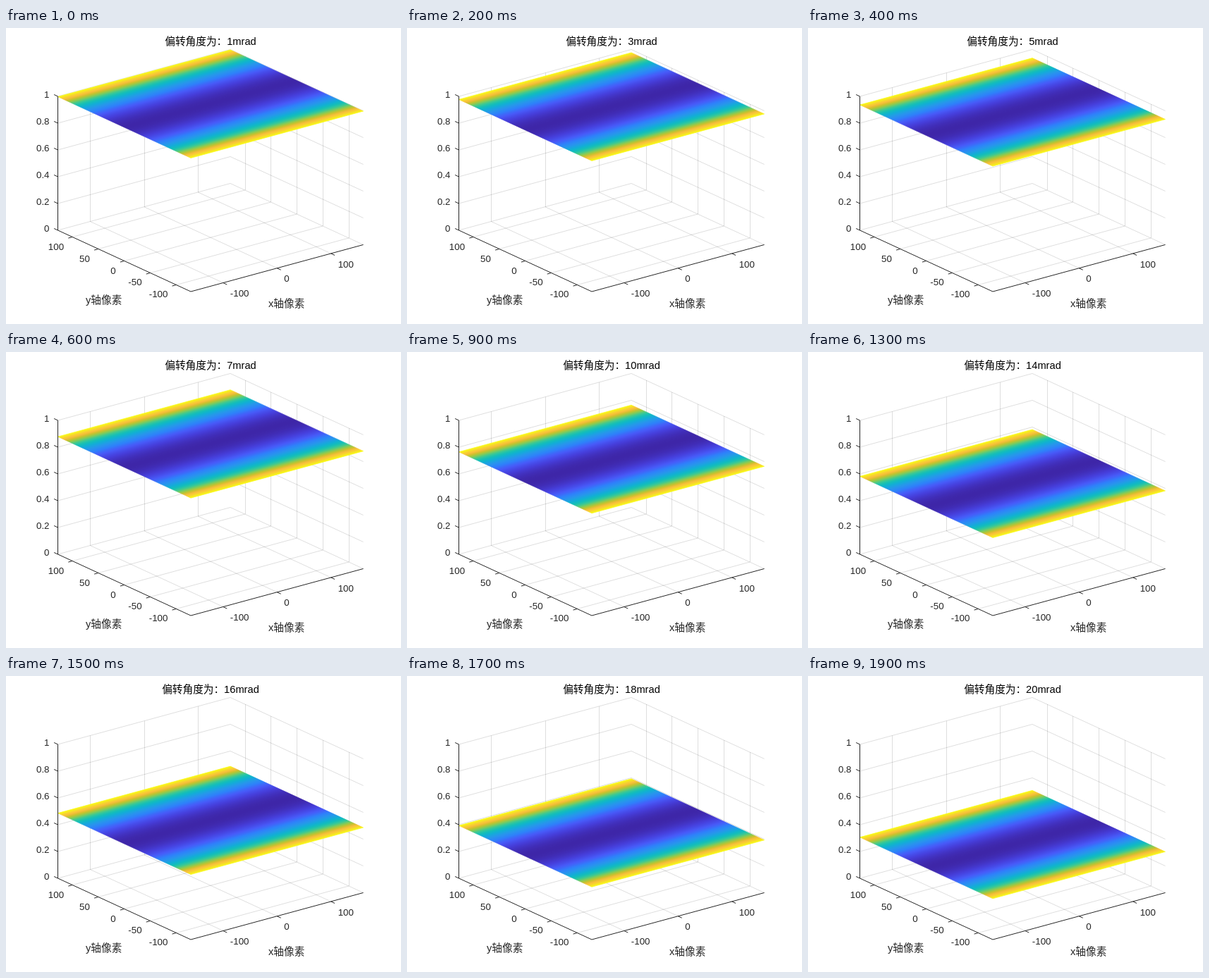
An HTML page that plays this animation: 560x420 px, repeating every 2 s.

```html
<!DOCTYPE html>
<html lang="zh-CN">
<head>
<meta charset="utf-8">
<style>
  html, body { margin: 0; width: 100%; height: 100%; overflow: hidden; background: #fff; }
  svg { display: block; }
  text { font: 300 13.33px "Liberation Sans", "Noto Sans CJK SC", "Noto Sans CJK", sans-serif; fill: #262626; }
  .large { font-size: 14.67px; }
  .title { fill: #000; text-anchor: middle; }
  .grid { stroke: #262626; stroke-opacity: .15; fill: none; }
  .axis { stroke: #262626; fill: none; }
  .sheet { fill: url(#bands); stroke: url(#bands); stroke-width: .7px; vector-effect: non-scaling-stroke; }
</style>
</head>
<body>
<svg width="560" height="420" viewBox="0 0 560 420">
  <defs><linearGradient id="bands" x1="0" y1="0" x2="0" y2="1"></linearGradient></defs>
  <path id="grid" class="grid"/>
  <g id="sheet"><rect class="sheet" width="1" height="1"/></g>
  <path id="axes" class="axis"/>
  <g id="labels"></g>
  <text class="large" x="113" y="391">y轴像素</text>
  <text class="large" x="372" y="396">x轴像素</text>
  <text id="title" class="large title" x="290" y="24"></text>
</svg>
<script>
const byId = id => document.getElementById(id);
const HEIGHT = 190, STEP = 100, COUNT = 20;
const origin = [73.5, 287], alongX = [244.5, -66.5], alongY = [188.5, 87];

// u runs along the x axis, v along the y axis towards the viewer, z upwards; all 0..1
const project = (u, v, z) => [
  origin[0] + u * alongX[0] + v * alongY[0],
  origin[1] + u * alongX[1] + v * alongY[1] - z * HEIGHT
];
const polyline = (...points) => 'M' + points.map(p => project(...p).join()).join('L');
const tick = ([x, y], dx, dy) => `M${x},${y}l${dx},${dy}`;

// Upright wall line, centred on a pixel column
function upright(u, v) {
  const [x, y] = project(u, v, 0);
  return `M${Math.round(x) + 0.5},${y}v${-HEIGHT}`;
}

function add(parent, tag, attributes, content = '') {
  const node = document.createElementNS('http://www.w3.org/2000/svg', tag);
  for (const name in attributes) node.setAttribute(name, attributes[name]);
  node.textContent = content;
  parent.append(node);
}
function label(value, x, middle, anchor) {
  add(byId('labels'), 'text', { x, y: middle + 4.7, 'text-anchor': anchor }, value);
}

let grid = '';
let axes = polyline([0, 0, 1], [0, 0, 0], [0, 1, 0], [1, 1, 0]);

for (const value of [-100, 0, 100]) {
  const u = (value + 160) / 320, p = project(u, 1, 0);
  grid += polyline([u, 1, 0], [u, 0, 0]) + upright(u, 0);
  axes += tick(p, 5.4, 2.5);
  label(value, p[0] + 10, p[1] + 15, 'start');
}
for (const value of [100, 50, 0, -50, -100]) {
  const v = (128 - value) / 256, p = project(0, v, 0);
  grid += polyline([0, v, 0], [1, v, 0]) + upright(1, v);
  axes += tick(p, -5.8, 1.6);
  label(value, p[0] - 12, p[1] + 13.3, 'end');
}
for (const z of [0, 0.2, 0.4, 0.6, 0.8, 1]) {
  const p = project(0, 0, z);
  grid += polyline([0, 0, z], [1, 0, z], [1, 1, z]);
  axes += tick(p, -5.4, -2.5);
  label(z, 61.5, p[1] - 2.7, 'end');
}
byId('grid').setAttribute('d', grid);
byId('axes').setAttribute('d', axes);

// Colour ramp in equal steps from the lowest to the highest value
const ramp = [
  [62, 38, 168], [70, 62, 219], [71, 91, 249], [46, 129, 250], [39, 151, 235],
  [18, 173, 215], [18, 190, 185], [55, 200, 151], [129, 204, 89], [200, 193, 41],
  [252, 187, 62], [245, 219, 42], [249, 251, 21]
];
function rampColor(value) {
  const at = value * (ramp.length - 1), i = Math.min(Math.floor(at), ramp.length - 2);
  return `rgb(${ramp[i].map((c, k) => Math.round(c + (ramp[i + 1][k] - c) * (at - i)))})`;
}
for (let i = 0; i <= 80; i++) {
  const offset = i / 80;
  add(byId('bands'), 'stop', { offset, 'stop-color': rampColor((2 * offset - 1) ** 2) });
}
byId('sheet').firstElementChild.setAttribute('transform',
  `matrix(${[...alongX, ...alongY, ...origin]})`);

// The sheet sinks with the squared sinc of the deflection angle
function efficiency(angle) {
  const phase = Math.PI * angle * 15 / 532;
  return (Math.sin(phase) / phase) ** 2;
}

let shown = 0;
function draw(now) {
  const angle = Math.floor(Math.max(0, now - start) / STEP) % COUNT + 1;
  if (angle !== shown) {
    shown = angle;
    byId('sheet').setAttribute('transform', `translate(0 ${-HEIGHT * efficiency(angle)})`);
    byId('title').textContent = `偏转角度为：${angle}mrad`;
  }
  requestAnimationFrame(draw);
}
const start = performance.now();
draw(start);
</script>
</body>
</html>
```
